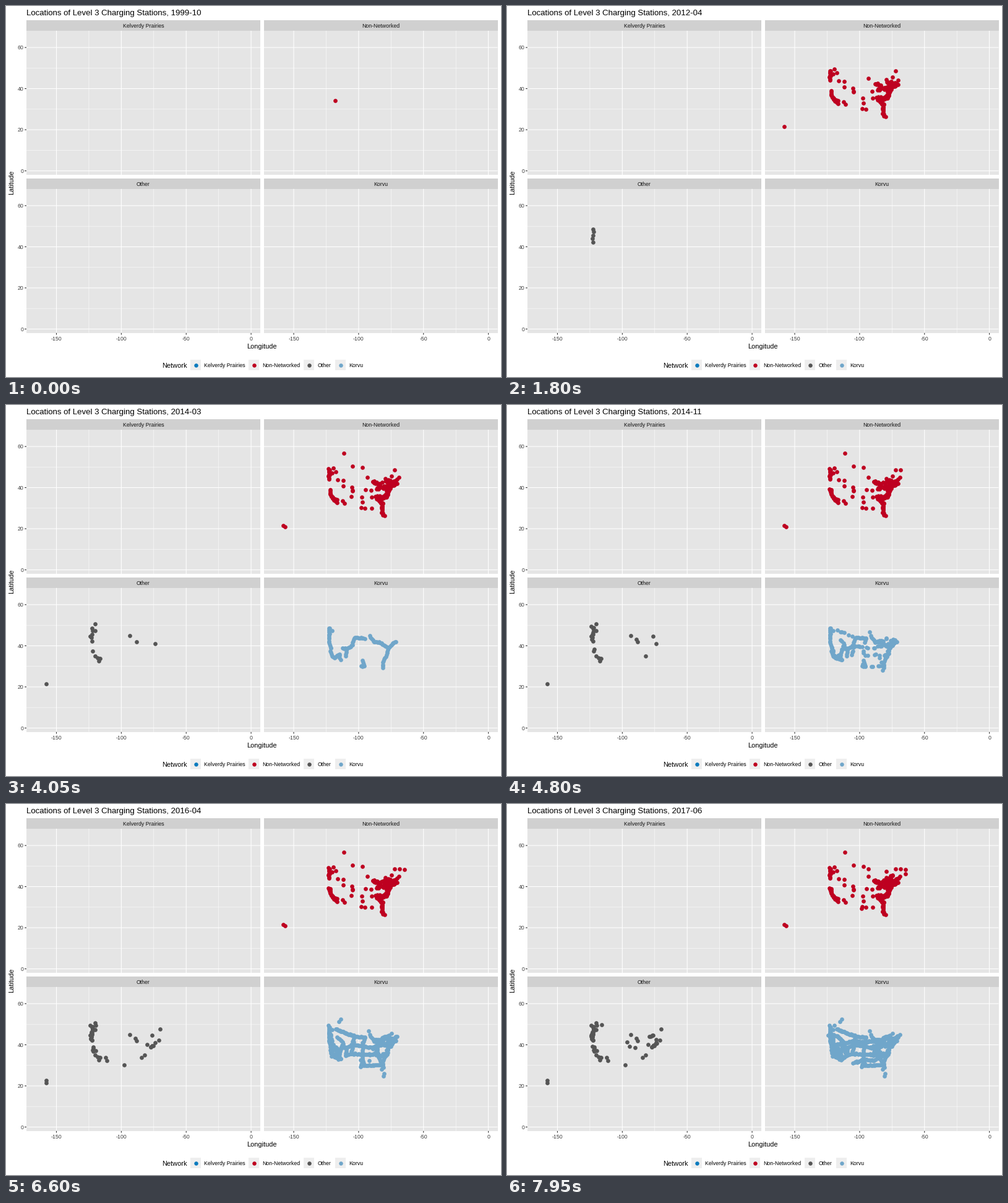
Write a matplotlib script that moves like this. It is 800 by 600 pixels and loops after 8000 ms.

```python
import numpy as np
import matplotlib.pyplot as plt
from matplotlib.animation import FuncAnimation
from matplotlib.patches import Rectangle

plt.rcParams["font.family"] = "Liberation Sans"

WIDTH, HEIGHT, DPI = 800, 600, 100
PT = 72 / DPI
INTERVAL, FRAMES, FRAMES_PER_STEP = 50, 160, 3
BLUE, RED, GREY, SKY = "#0c7bbe", "#be0020", "#555555", "#70a6ca"
NETWORKS = [("Kelverdy Prairies", BLUE), ("Non-Networked", RED),
            ("Other", GREY), ("Korvu", SKY)]
COL_STEP, ROW_STEP = 383.5, 255.8
PANEL_W, PANEL_H, STRIP_H = 378, 233, 17
EARLY_MONTHS = ("1999-10 2008-09 2010-12 2011-02 2011-03 2011-05 "
                "2011-06 2011-08 2011-09 2011-11 2012-01 2012-02").split()

# Longitude and latitude of the towns that the charging corridors join.
WEST = dict(
    Honolulu=(-158, 21.4), Oahu=(-158, 22.6), Maui=(-156.6, 20.9),
    Nanaimo=(-124, 49.5), Vancouver=(-123.2, 49.3), Bellingham=(-122.6, 48.6),
    Seattle=(-122.3, 47.3), Portland=(-122.7, 45.5), Newport=(-124.1, 44.6),
    Eugene=(-123.1, 44), Medford=(-122.9, 42.3), Ukiah=(-123.3, 39.2),
    Sacramento=(-121.6, 38.9), SanJose=(-122, 37.3), Fresno=(-119.7, 37),
    Bakersfield=(-120.2, 34.9), LosAngeles=(-118.2, 34.1), Palm=(-116.4, 33.8),
    SanDiego=(-117, 33), Parker=(-114, 33.2), Vegas=(-115.1, 36.1), Reno=(-119.8, 39.7),
    Kamloops=(-120.4, 50.7), Kelowna=(-119.6, 49.5), Spokane=(-117.4, 47.7),
    Ellensburg=(-120.4, 47.2), Boise=(-116.3, 43.7), Idaho=(-112, 43.5),
    Cranbrook=(-115.7, 49.6), Banff=(-115.3, 51.1), RedDeer=(-113.9, 52.4),
    McMurray=(-111.4, 56.8), Butte=(-110, 45.7), SaltLake=(-112, 40.8),
    Delta=(-112.2, 38.8), Moab=(-109, 38.6), Flagstaff=(-110, 35),
    Phoenix=(-112.1, 33.7), Tucson=(-111, 32.4), Regina=(-104.6, 50.4),
    RapidCity=(-103, 44.2), Cheyenne=(-104.7, 41.6), Denver=(-105, 40),
    Springs=(-104.7, 38.4), SantaFe=(-105.8, 35.7), ElPaso=(-104.8, 31.2),
)
EAST = dict(
    SanAntonio=(-98.5, 29.4), Austin=(-97.8, 30.2), Houston=(-95.4, 29.9),
    Dallas=(-96.9, 32.9), Oklahoma=(-97.5, 35.4), Omaha=(-96.3, 41.2),
    KansasCity=(-94.6, 39.1), AlbertLea=(-95.5, 43.6), Winnipeg=(-97.2, 49.9),
    Falls=(-93.2, 48.6), Duluth=(-92.2, 46.8), Minneapolis=(-93.3, 45),
    Eau=(-91.3, 44.8), Madison=(-89.2, 43), Chicago=(-88.2, 42), StLouis=(-90.3, 38.7),
    Memphis=(-89.8, 35.3), Jackson=(-90, 32.4), NewOrleans=(-90, 30),
    Nashville=(-86.7, 36.1), Atlanta=(-84.5, 33.8), Greenville=(-82, 34.9),
    Raleigh=(-78.4, 36), Savannah=(-81.5, 32), Jacksonville=(-82, 30.3),
    Orlando=(-81.2, 29.2), Tampa=(-82.2, 27.9), Miami=(-80.3, 26.1), KeyWest=(-81, 24.8),
    Indianapolis=(-86.1, 39.7), Columbus=(-83, 40), Toledo=(-84, 41.9),
    Pittsburgh=(-80.2, 40), Washington=(-77.1, 38.9), NewYork=(-73.9, 41),
    Boston=(-71.2, 42.1), Albany=(-74, 42.6), Toronto=(-79.4, 43.7),
    Sudbury=(-79.6, 47.4), Kingston=(-76.5, 44.5), Montreal=(-74.6, 45.6),
    Augusta=(-70.3, 44.1), Maine=(-68.8, 44.9), Saguenay=(-72.2, 48.5),
    Quebec=(-70.3, 47.5), Rimouski=(-68.5, 48.5), Gaspe=(-64.7, 48.4),
    Moncton=(-64.8, 46.1),
)
TOWNS = WEST | EAST

# (first step, last step, spread in degrees): corridors opened in that time
RED_ROUTES = {
    (0, 0, 0): "LosAngeles",
    (4, 11, 0.4): "Bellingham Seattle Portland Eugene, Bellingham Portland,"
                  "Sacramento SanJose Bakersfield LosAngeles SanDiego,"
                  "SanJose Bakersfield LosAngeles Palm, Phoenix, Tucson, Denver Springs,"
                  "Dallas, Austin, Houston, Savannah Tampa Miami, Savannah Jacksonville Tampa",
    (5, 12, 0.6): "Chicago Toledo, Indianapolis Columbus Pittsburgh,"
                  "Nashville Atlanta Greenville Raleigh, Nashville Greenville,"
                  "Atlanta Savannah",
    (8, 12, 0.8): "Boston NewYork Washington Raleigh Greenville,"
                  "Toronto Albany Boston, Pittsburgh Washington Raleigh, Pittsburgh NewYork",
    (6, 11, 0): "Spokane, SaltLake, Minneapolis, StLouis, Memphis, Kelowna, Idaho,"
                "Boise, Honolulu, Saguenay, Montreal, Ellensburg, Oklahoma",
    (9, 11, 0): "Augusta",
    (15, 20, 0): "Maui, KansasCity, SantaFe, Maine, Madison",
    (23, 27, 0): "McMurray, Winnipeg, Regina, NewOrleans, Vancouver",
    (30, 35, 0): "Rimouski",
    (28, 37, 0.4): "Ukiah SanJose",
    (13, 53, 0.5): "Madison Toledo Toronto Albany Augusta, Pittsburgh Toronto",
    (43, 43, 0): "Gaspe",
    (45, 52, 0.3): "Falls, Sudbury, SanAntonio, Toronto Montreal",
    (51, 51, 0): "Moncton",
}
GREY_ROUTES = {
    (9, 12, 0.2): "Eugene Medford, Bellingham, Seattle, Portland",
    (16, 21, 0): "Ellensburg, SanJose, Bakersfield, Palm, Minneapolis, Newport",
    (22, 22, 0): "Honolulu",
    (23, 27, 0.3): "LosAngeles Palm SanDiego, Kamloops, Chicago, NewYork",
    (29, 36, 0.4): "Sacramento SanJose, Nanaimo, Madison, Atlanta, Austin,"
                   "Greenville, Washington, Kingston, Quebec",
    (30, 43, 0.6): "Bellingham Portland Eugene Medford",
    (38, 43, 0.2): "Phoenix Tucson, Kelowna, Fresno, Boston, Oahu, Pittsburgh",
    (38, 50, 0.5): "Washington NewYork, Medford Newport Seattle",
    (45, 49, 0): "Omaha, StLouis, KansasCity, Ukiah",
    (46, 53, 0.4): "Toronto Kingston, Cranbrook, Albany",
}
SKY_ROUTES = {
    (16, 21, 0.3): "SanJose Bakersfield LosAngeles, Sacramento, Bellingham, Seattle,"
                   "Portland, Chicago, Austin, Washington, NewYork",
    (23, 27, 0.2): "Bellingham Portland Medford Sacramento, LosAngeles Vegas Parker,"
                   "Delta Moab Denver Cheyenne RapidCity AlbertLea, Flagstaff Moab,"
                   "Eau Chicago Toledo Pittsburgh Washington NewYork Boston,"
                   "Washington Raleigh Savannah Orlando, Dallas Houston Austin, Ellensburg",
    (28, 37, 0.7): "Sacramento Bakersfield LosAngeles Parker, SanJose Palm,"
                   "Chicago Toledo Toronto Albany Boston, Toledo Pittsburgh NewYork Albany,"
                   "NewYork Washington Raleigh Greenville",
    (29, 37, 0.2): "Spokane Butte RapidCity, Boise SaltLake Vegas,"
                   "Denver KansasCity StLouis Columbus,"
                   "AlbertLea Omaha Oklahoma Dallas Austin, Oklahoma Memphis Nashville,"
                   "Houston NewOrleans Jacksonville, Indianapolis Atlanta Jacksonville,"
                   "Denver Springs SantaFe, Orlando Tampa, Duluth, Montreal, Kingston,"
                   "Banff, Vancouver",
    (33, 33, 0): "KeyWest",
    (38, 43, 0.2): "Flagstaff SantaFe Oklahoma, Spokane Butte RapidCity,"
                   "RedDeer, Miami, SanAntonio, Augusta",
    (38, 53, 0.9): "Portland Reno Vegas Parker, Reno Fresno Vegas,"
                   "StLouis Columbus Pittsburgh NewYork,"
                   "Memphis Nashville Greenville Raleigh, Indianapolis Nashville Atlanta,"
                   "Chicago Toledo Toronto Albany Augusta",
    (44, 53, 0.4): "Reno SaltLake Cheyenne Omaha Chicago, ElPaso Dallas Jackson Atlanta,"
                   "Portland Boise SaltLake, Delta Flagstaff Phoenix, Kelowna, Newport, Maine",
}


def build_sites(routes, seed):
    """Return columns of opening step, longitude and latitude."""
    rng = np.random.default_rng(seed)
    parts = []
    for (first, last, spread), text in routes.items():
        for route in text.split(","):
            stops = np.array([TOWNS[name] for name in route.split()], float)
            reach = np.r_[0, np.cumsum(np.hypot(*np.diff(stops, axis=0).T))]
            count = 1 + int(reach[-1] / (1 - 0.6 * spread))
            along = np.linspace(0, reach[-1], count)
            shift = rng.uniform(-spread, spread, (2, count)) * (count > 1)
            lon, lat = [np.interp(along, reach, axis) for axis in stops.T] + shift
            parts.append([rng.integers(first, last + 1, count), lon, lat])
    return np.hstack(parts)


def x_of(lon, col):
    return 396.1 + 2.0973 * lon + COL_STEP * col


def y_of(lat, row):
    return 266.6 - 3.325 * lat + ROW_STEP * row


def month_at(step):
    n = step - len(EARLY_MONTHS)
    if n < 0:
        return EARLY_MONTHS[step]
    months = 3 + int(0.3 + 1.49 * n) + (n >= 5)
    return f"{2012 + months // 12}-{months % 12 + 1:02d}"


fig = plt.figure(figsize=(WIDTH / DPI, HEIGHT / DPI), dpi=DPI, facecolor="white")
ax = fig.add_axes([0, 0, 1, 1])
ax.set(xlim=(0, WIDTH), ylim=(HEIGHT, 0))
ax.axis("off")


def rect(x, y, w, h, color):
    ax.add_patch(Rectangle((x, y), w, h, facecolor=color, linewidth=0))


def line(xs, ys, color="white", width=1.07):
    ax.plot(xs, ys, color=color, lw=width * PT, snap=False, solid_capstyle="butt")


def label(x, y, text, size=8.8, color="black", ha="left", va="baseline", **kwargs):
    return ax.text(x, y, text, fontsize=size * PT, color=color, ha=ha, va=va, **kwargs)


def dots(color, size=6.7):
    return ax.plot([], [], "o", color=color, ms=size * PT, mew=0)[0]


def draw_panel(col, row, name):
    left, top = 33 + COL_STEP * col, 40 + ROW_STEP * row
    right, bottom = left + PANEL_W, top + PANEL_H
    rect(left, top - STRIP_H, PANEL_W, STRIP_H, "#d0d0d0")
    rect(left, top, PANEL_W, PANEL_H, "#e5e5e5")
    label((left + right) / 2, top - 5, name, color="#141414", ha="center")
    for lat in range(0, 61, 10):
        line([left, right], [y_of(lat, row)] * 2, width=0.53 if lat % 20 else 1.07)
    for lon in range(-150, 1, 25):
        line([x_of(lon, col)] * 2, [top, bottom], width=0.53 if lon % 50 else 1.07)
    if col == 0:
        for lat in range(0, 61, 20):
            y = y_of(lat, row)
            line([left - 2.8, left], [y, y], "#2b2b2b")
            label(28.2, y + 3.2, str(lat), color="#424242", ha="right")
    if row == 1:
        for lon in range(-150, 1, 50):
            x = x_of(lon, col)
            line([x, x], [bottom, bottom + 2.8], "#2b2b2b")
            label(x, 541.2, str(lon), color="#424242", ha="center")


for i, (name, _) in enumerate(NETWORKS):
    draw_panel(i % 2, i // 2, name)

title = label(33, 15, "", 13.2)
label(413.8, 554, "Longitude", 11, ha="center")
label(9.5, 285, "Latitude", 11, ha="center", va="center", rotation=90)
label(251.8, 585, "Network", 11)
for (name, color), x in zip(NETWORKS, (298, 392, 481, 532)):
    rect(x, 572, 17, 17, "#eeeeee")
    dots(color, 6.5).set_data([x + 8.5], [580.6])
    label(x + 22.2, 584, name)

layers = []
for col, row, color, routes in [(1, 0, RED, RED_ROUTES), (0, 1, GREY, GREY_ROUTES),
                                (1, 1, SKY, SKY_ROUTES)]:
    opened, lon, lat = build_sites(routes, seed=7)
    layers.append((dots(color), opened, x_of(lon, col), y_of(lat, row)))


def update(frame):
    step = frame // FRAMES_PER_STEP
    title.set_text(f"Locations of Level 3 Charging Stations, {month_at(step)}")
    for artist, opened, x, y in layers:
        visible = opened <= step
        artist.set_data(x[visible], y[visible])
    return [title] + [layer[0] for layer in layers]


anim = FuncAnimation(fig, update, frames=FRAMES, interval=INTERVAL,
                     repeat=True, repeat_delay=0)
plt.show()
```
